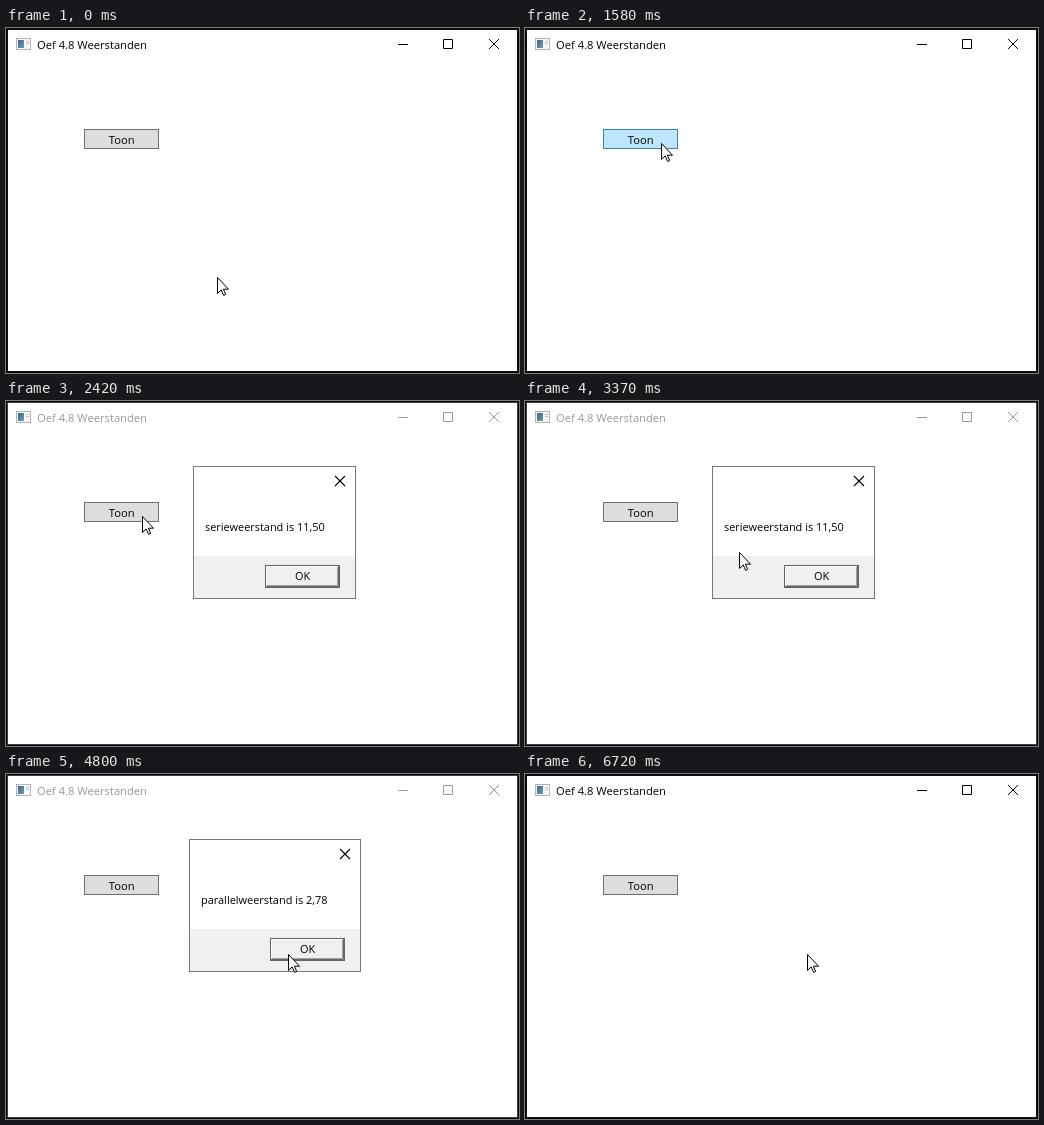
Recreate the animation shown at these times as an HTML page. Size 513 by 345 pixels, loop 7.98 s.

```html
<!DOCTYPE html>
<html lang="nl">
<head>
<meta charset="utf-8">
<title>Weerstanden</title>
<style>
html, body { margin: 0; width: 100%; height: 100%; overflow: hidden; background: #fff; }
svg { display: block; width: 513px; height: 345px; }
text { font: 11.2px "Open Sans", "Noto Sans", sans-serif; white-space: pre; }
.dialog text { font-size: 10.95px; }
.line { fill: none; stroke: #000; }
#bar.idle text { fill: #999; }
#bar.idle .line { stroke: #999; }
</style>
</head>
<body>
<svg viewBox="0 0 513 345">
  <defs>
    <linearGradient id="pane" x2="1" y2="1">
      <stop stop-color="#3b6191"/><stop offset="1" stop-color="#6aa3a8"/>
    </linearGradient>
  </defs>
  <rect x=".5" y=".5" width="512" height="344" fill="#fff" stroke="#000"/>
  <rect id="edge" x="1.5" y="1.5" width="510" height="342" fill="none"/>

  <g id="bar">
    <rect x="10.5" y="10.5" width="14" height="11" fill="#f6f6f6" stroke="#b4b4b4"/>
    <rect x="12" y="12" width="6" height="8" fill="url(#pane)"/>
    <path d="M20 13.5h3M20 15.5h3" stroke="#c4c4c4"/>
    <text x="31" y="21">Oef 4.8 Weerstanden</text>
    <path class="line" d="M392 16.5h10M437.5 11.5h9v9h-9zM483 11l10 10m0-10l-10 10"/>
  </g>

  <rect id="show" x="78.5" y="101.5" width="74" height="19"/>
  <text x="115.7" y="116" text-anchor="middle">Toon</text>

  <g id="dialogs"></g>
  <circle id="click" r="12.5" fill="#ff0" opacity=".5"/>
  <path id="cursor" d="M.5 .5V16.5L4.2 12.9 6.6 18.4 8.7 17.5 6.4 12.2H11.5Z" fill="#fff" stroke="#000"/>
</svg>
<script>
const LOOP = 7980;
const $ = id => document.getElementById(id);
const set = (el, attrs) => { for (const k in attrs) el.setAttribute(k, attrs[k]); };

function makeDialog(left, width, message) {
  const g = document.createElementNS("http://www.w3.org/2000/svg", "g");
  const right = left + width, bx = right - 91;
  g.setAttribute("class", "dialog");
  g.innerHTML = `
    <rect x="${left + .5}" y="65.5" width="${width - 1}" height="132" fill="#fff" stroke="#777"/>
    <rect x="${left + 1}" y="155" width="${width - 2}" height="42" fill="#f0f0f0"/>
    <path class="line" d="M${right - 21} 75l10 10m0-10l-10 10" stroke-width="1.1"/>
    <text x="${left + 12}" y="130">${message}</text>
    <rect x="${bx + .5}" y="164.5" width="74" height="22" fill="#f0f0f0" stroke="#646464"/>
    <g class="up" fill="none">
      <path d="M${bx + 1.5} 185V165.5H${bx + 73}" stroke="#fff"/>
      <path d="M${bx + 2} 184.5H${bx + 72.5}V166" stroke="#a0a0a0"/>
      <path d="M${bx + 1} 185.5H${bx + 73.5}V165" stroke="#696969"/>
    </g>
    <rect class="down" x="${bx + 1.5}" y="165.5" width="72" height="20" fill="none" stroke="#a0a0a0"/>
    <text class="ok" x="${bx + 37.5}" y="179" text-anchor="middle">OK</text>`;
  $("dialogs").append(g);
  const [up, down, ok] = ["up", "down", "ok"].map(c => g.querySelector("." + c));
  return (opacity, pressed) => {
    const scale = .92 + .08 * opacity, cx = left + width / 2, cy = 131.5;
    set(g, {
      opacity,
      visibility: opacity ? "visible" : "hidden",
      transform: `translate(${cx} ${cy}) scale(${scale}) translate(${-cx} ${-cy})`
    });
    set(up, { opacity: pressed ? 0 : 1 });
    set(down, { opacity: pressed ? 1 : 0 });
    set(ok, { transform: pressed ? "translate(1 1)" : "" });
  };
}

const drawSeries = makeDialog(187, 163, "serieweerstand is 11,50");
const drawParallel = makeDialog(183, 172, "parallelweerstand is 2,78");

// [time, opacity], each held until the next
const seriesFade = [[2248, .35], [2334, .75], [2420, 1], [4575, .6], [4650, .15], [4725, 0]];
const parallelFade = [[4725, .5], [4800, 1], [6480, .75], [6560, .4], [6640, .12], [6720, 0]];
const held = (keys, t) => keys.reduce((v, [at, next]) => t >= at ? next : v, 0);

// start, end, number of steps, target x, target y
const moves = [
  [880, 1580, 10, 136, 115],
  [2900, 3690, 11, 273, 179],
  [3770, 3940, 3, 281, 180],
  [4340, 4341, 1, 282, 180]
];

function cursorAt(t) {
  let x = 211, y = 249;
  for (const [start, end, n, tx, ty] of moves) {
    if (t < start) break;
    const step = Math.floor((t - start) / (end - start) * (n - 1)) + 1;
    const p = Math.min(1, step / n), e = p * p * (3 - 2 * p);
    x += (tx - x) * e;
    y += (ty - y) * e;
  }
  return [Math.round(x), Math.round(y)];
}

function draw(t) {
  const within = (a, b) => t >= a && t < b;
  const [x, y] = cursorAt(t);
  const showPress = within(1990, 2162);
  const seriesPress = within(4500, 4575), parallelPress = within(6400, 6480);
  const idle = within(2248, 6560);
  const hover = !idle && x >= 78 && x < 153 && y >= 101 && y < 121;

  $("bar").classList.toggle("idle", idle);
  set($("edge"), { stroke: idle ? "#444" : "#111" });
  const [fill, stroke] = showPress ? ["#c4e5f6", "#2c628b"]
    : hover ? ["#bee6fd", "#3c7fb1"] : ["#ddd", "#707070"];
  set($("show"), { fill, stroke });

  drawSeries(held(seriesFade, t), seriesPress);
  drawParallel(held(parallelFade, t), parallelPress);

  set($("click"), {
    cx: x + .5, cy: y + .5,
    visibility: showPress || seriesPress || parallelPress ? "visible" : "hidden"
  });
  set($("cursor"), { transform: `translate(${x} ${y})` });
}

const begin = performance.now();
function frame() {
  draw((performance.now() - begin) % LOOP);
  requestAnimationFrame(frame);
}
frame();
</script>
</body>
</html>
```
